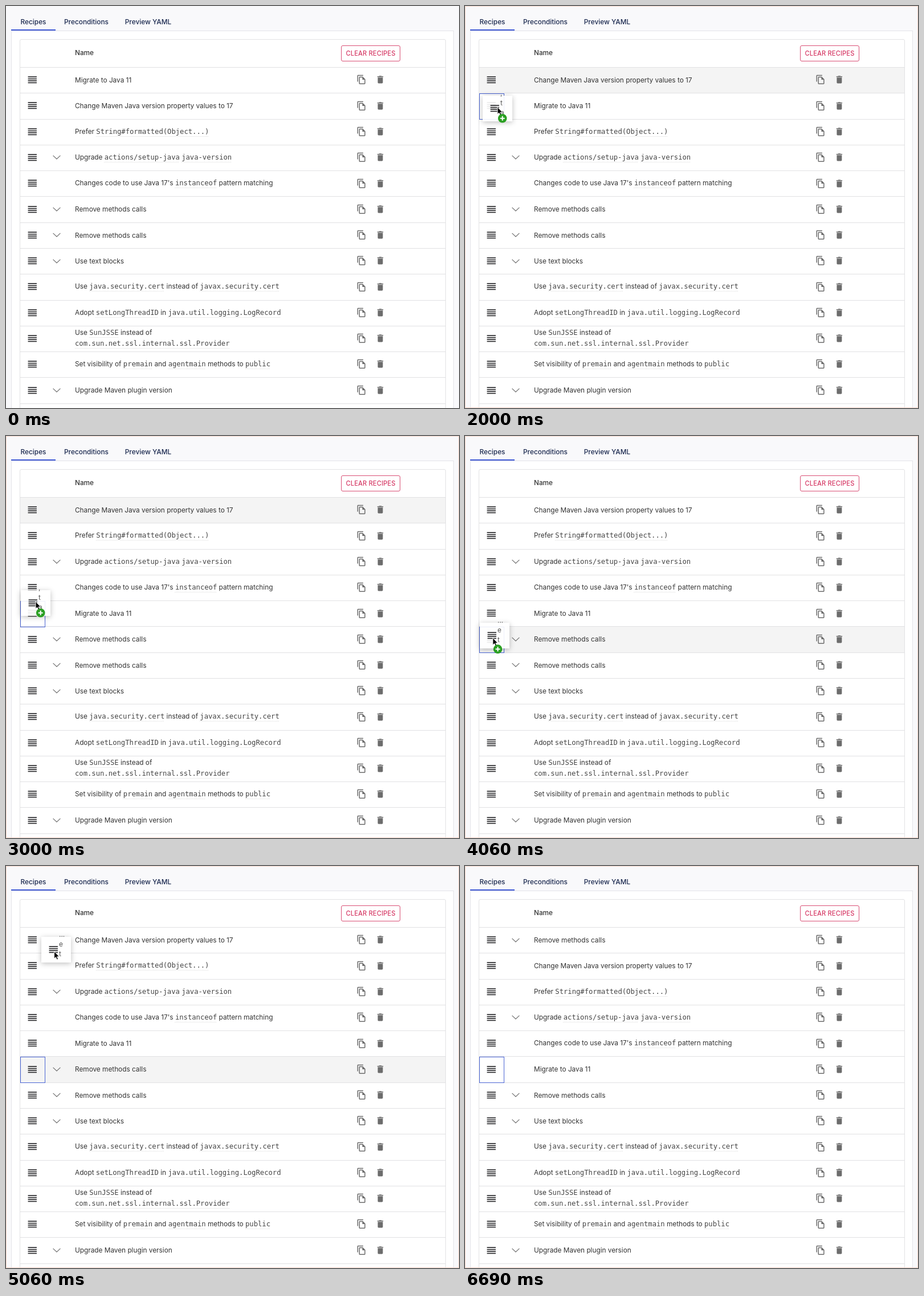
Animation of 795x704 px, one loop 7.06 s. Source, as an HTML page:

```html
<!DOCTYPE html>
<html lang="en">
<head>
<meta charset="utf-8">
<title>Recipe list</title>
<style>
  html, body { margin: 0; width: 100%; height: 100%; overflow: hidden; }
  body { position: relative; background: #f9f9fb; color: #333; font: 11.8px Inter, sans-serif; }
  body *, body { box-sizing: border-box; }
  .abs, .row, .slot, .tab { position: absolute; }
  .tab { top: 18px; line-height: 20px; transform: translateX(-50%); font-size: 11.85px; font-weight: 500; color: #1c2a50; white-space: nowrap; }
  #bar { left: 9px; top: 41px; width: 78px; height: 2px; background: #3d57d4; }
  #panel { left: 9px; top: 43px; width: 777px; height: 680px; background: #fff; border: 1px solid #e4e4e9; }
  #table { left: 24px; top: 58px; width: 748px; height: 680px; border: 1px solid #e2e2e4; border-radius: 3px; }
  #name { left: 121px; top: 72px; line-height: 20px; font-weight: 500; }
  #clear { left: 588px; top: 69px; width: 104px; height: 28px; border: 1px solid #d94f75; border-radius: 3px; color: #d63a66; font-size: 11.1px; font-weight: 500; letter-spacing: .15px; line-height: 26px; text-align: center; white-space: nowrap; }
  .slot { left: 25px; width: 746px; height: 45.28px; border-top: 1px solid #e1e1e3; }
  .slot.on { background: #f4f4f4; }
  .row { left: 0; width: 795px; height: 45px; }
  .row svg { position: absolute; overflow: visible; }
  .label { position: absolute; left: 121px; top: 1px; height: 45px; display: flex; align-items: center; line-height: 19px; white-space: nowrap; }
  .label:has(code) { top: 0; }
  code { font: 12.2px "DejaVu Sans Mono", monospace; line-height: 1; color: #444; text-decoration: underline dotted #dcdcdc 1px; text-underline-offset: 4px; }
  #focus { left: 25px; width: 44px; height: 46px; margin-top: .6px; border: 1px solid #4a65d4; }
  #ghost { left: 0; top: 0; width: 52px; height: 45px; background: rgba(255, 255, 255, .9); box-shadow: 0 2px 9px rgba(0, 0, 0, .25); color: #555; }
  #ghost svg { position: absolute; left: 10.5px; top: 11.5px; }
  #ghost span { position: absolute; left: 31px; line-height: 16px; }
  #cursor { left: 0; top: 0; overflow: visible; }
  #edge { inset: 0; border: 1px solid #f8d8cc; }
</style>
</head>
<body>
<div class="tab" style="left:48px">Recipes</div>
<div class="tab" style="left:141px">Preconditions</div>
<div class="tab" style="left:249.5px">Preview YAML</div>
<div id="panel" class="abs"></div>
<div id="bar" class="abs"></div>
<div id="table" class="abs"></div>
<div id="name" class="abs">Name</div>
<div id="clear" class="abs">CLEAR RECIPES</div>
<div id="list"></div>
<div id="focus" class="abs"></div>
<div id="ghost" class="abs"></div>
<svg id="cursor" class="abs" width="1" height="1">
  <g id="arrow">
    <path d="M0 0V12.5L2.8 10L4.7 14.3L6.9 13.3L5 9.2H8.8Z" fill="#000" stroke="#fff" stroke-width=".9"/>
    <g id="plus">
      <circle cx="8.7" cy="19.7" r="7.8" fill="#2a9f22"/>
      <path d="M4.7 19.7h8M8.7 15.7v8" stroke="#fff" stroke-width="2"/>
    </g>
  </g>
  <g id="move" fill="none">
    <path d="M-5 0H5M0-5V5" stroke="#fff" stroke-width="3.4"/>
    <path d="M-5 0H5M0-5V5" stroke="#111" stroke-width="1.6"/>
    <path d="M-7.5 0l3-2.6v5.2zM7.5 0l-3-2.6v5.2zM0-7.5l-2.6 3h5.2zM0 7.5l-2.6-3h5.2z" fill="#111" stroke="#fff" stroke-width=".5"/>
  </g>
</svg>
<div id="edge" class="abs"></div>
<script>
const LOOP = 7060, TICK = 62.5, TOP = 107, STEP = 45.28, COLUMN = 68;
const $ = id => document.getElementById(id);

// Backticks mark code, a leading ">" marks an expandable recipe.
const recipes = [
  'Migrate to Java 11',
  'Change Maven Java version property values to 17',
  'Prefer `String#formatted(Object...)`',
  '>Upgrade `actions/setup-java` `java-version`',
  "Changes code to use Java 17's `instanceof` pattern matching",
  '>Remove methods calls',
  '>Remove methods calls',
  '>Use text blocks',
  'Use `java.security.cert` instead of `javax.security.cert`',
  'Adopt `setLongThreadID` in `java.util.logging.LogRecord`',
  'Use `SunJSSE` instead of<br>`com.sun.net.ssl.internal.ssl.Provider`',
  'Set visibility of `premain` and `agentmain` methods to `public`',
  '>Upgrade Maven plugin version'
];

const icon = (x, y, size, d, fill) =>
  `<svg style="left:${x}px;top:${y}px" width="${size}" height="${size}" viewBox="0 0 24 24" fill="${fill}"><path d="${d}"/></svg>`;
const handle = icon(36.3, 12.2, 20.5, 'M3 5h18v2H3zM3 9h18v2H3zM3 13h18v2H3zM3 17h18v2H3z', '#303033');
const copy = icon(615, 13.4, 17.8, 'M16 1H4c-1.1 0-2 .9-2 2v14h2V3h12V1zm-1 4H8c-1.1 0-2 .9-2 2v14c0 1.1.9 2 2 2h11c1.1 0 2-.9 2-2V11l-6-6zM8 21V7h6v5h5v9H8z', '#6c6c6c');
const bin = icon(648.3, 13.4, 17.8, 'M6 19c0 1.1.9 2 2 2h8c1.1 0 2-.9 2-2V7H6v12zM19 4h-3.5l-1-1h-5l-1 1H5v2h14V4z', '#6c6c6c');
const chevron = '<svg style="left:82px;top:18.6px" width="14" height="8"><path d="M.6.8L7 7L13.4.8" fill="none" stroke="#6a6a6a" stroke-width="1.1"/></svg>';

const rowTop = i => TOP + STEP * i;
const rowAt = y => Math.floor((y - TOP) / STEP);

function add(cls, html = '') {
  const el = document.createElement('div');
  el.className = cls;
  el.innerHTML = html;
  $('list').append(el);
  return el;
}

const slots = Array.from({ length: recipes.length + 1 }, (_, i) => {
  const el = add('slot');
  el.style.top = rowTop(i) + 'px';
  return el;
});

const rows = recipes.map(text => {
  const nested = text.startsWith('>');
  const label = text.slice(nested ? 1 : 0).replace(/`(.*?)`/g, '<code>$1</code>');
  return add('row', handle + (nested ? chevron : '') +
    `<div class="label"><div>${label}</div></div>` + copy + bin);
});

// Pointer path: time, x, y
const path = [
  [400, 260, 715], [820, 48, 130], [1640, 48, 130], [1800, 52, 145], [2000, 57, 177],
  [2400, 57, 214], [3000, 52, 290], [3320, 50, 308], [3750, 47, 354], [4050, 47, 354],
  [4260, 78, 345], [4690, 93, 206], [5050, 86, 150], [5300, 58, 142], [5500, 50, 144],
  [5850, 50, 138], [6190, 54, 140], [6640, 250, 715]
];
const drags = [
  { from: 0, start: 1640, end: 3320, marks: [',', 't', 'a'], dx: -26.5, dy: -20.5 },
  { from: 5, start: 4050, end: 5850, marks: ['...', 'e', 't'], dx: -23, dy: -26 }
];

function pointer(t) {
  const n = path.findIndex(p => p[0] > t);
  if (n < 1) return null;
  const [t0, x0, y0] = path[n - 1], [t1, x1, y1] = path[n];
  const k = (t - t0) / (t1 - t0);
  return { x: x0 + (x1 - x0) * k, y: y0 + (y1 - y0) * k };
}

function target(drag, t) {
  const p = pointer(t);
  return p.x < COLUMN ? rowAt(p.y) : drag.from;
}

const show = (el, on) => { el.style.display = on ? '' : 'none'; };
const place = (el, x, y) => { el.style.transform = `translate(${x}px, ${y}px)`; };

function render(t) {
  const p = pointer(t), order = rows.map((_, i) => i);
  let active = null, focus = -1;
  for (const drag of drags) {
    if (t < drag.start) break;
    const to = target(drag, Math.min(t, drag.end));
    order.splice(to, 0, order.splice(drag.from, 1)[0]);
    if (t < drag.end) active = drag;
    focus = active ? to : drag.from;
  }

  order.forEach((id, i) => { rows[id].style.top = rowTop(i) + 'px'; });
  const hover = active ? active.from : p ? rowAt(p.y) : -1;
  slots.forEach((el, i) => el.classList.toggle('on', i === hover));

  show($('focus'), focus >= 0);
  $('focus').style.top = rowTop(Math.max(focus, 0)) + 'px';
  show($('edge'), t >= TICK);

  show($('ghost'), active);
  if (active) {
    if ($('ghost').dataset.marks !== active.marks.join()) {
      $('ghost').dataset.marks = active.marks.join();
      $('ghost').innerHTML = handle.replace(/style=".*?"/, '') +
        active.marks.map((m, i) => `<span style="top:${i * 17 - 12}px">${m}</span>`).join('');
    }
    place($('ghost'), Math.round(p.x + active.dx), Math.round(p.y + active.dy));
  }

  show($('cursor'), p);
  if (p) {
    const inColumn = p.x < COLUMN;
    place($('cursor'), p.x, p.y);
    show($('move'), !active && inColumn);
    show($('arrow'), active || !inColumn);
    show($('plus'), active && inColumn);
  }
}

const born = performance.now();
function tick() {
  const t = (performance.now() - born) % LOOP;
  render(Math.floor((t + 3) / TICK) * TICK);
  requestAnimationFrame(tick);
}
tick();
</script>
</body>
</html>
```
